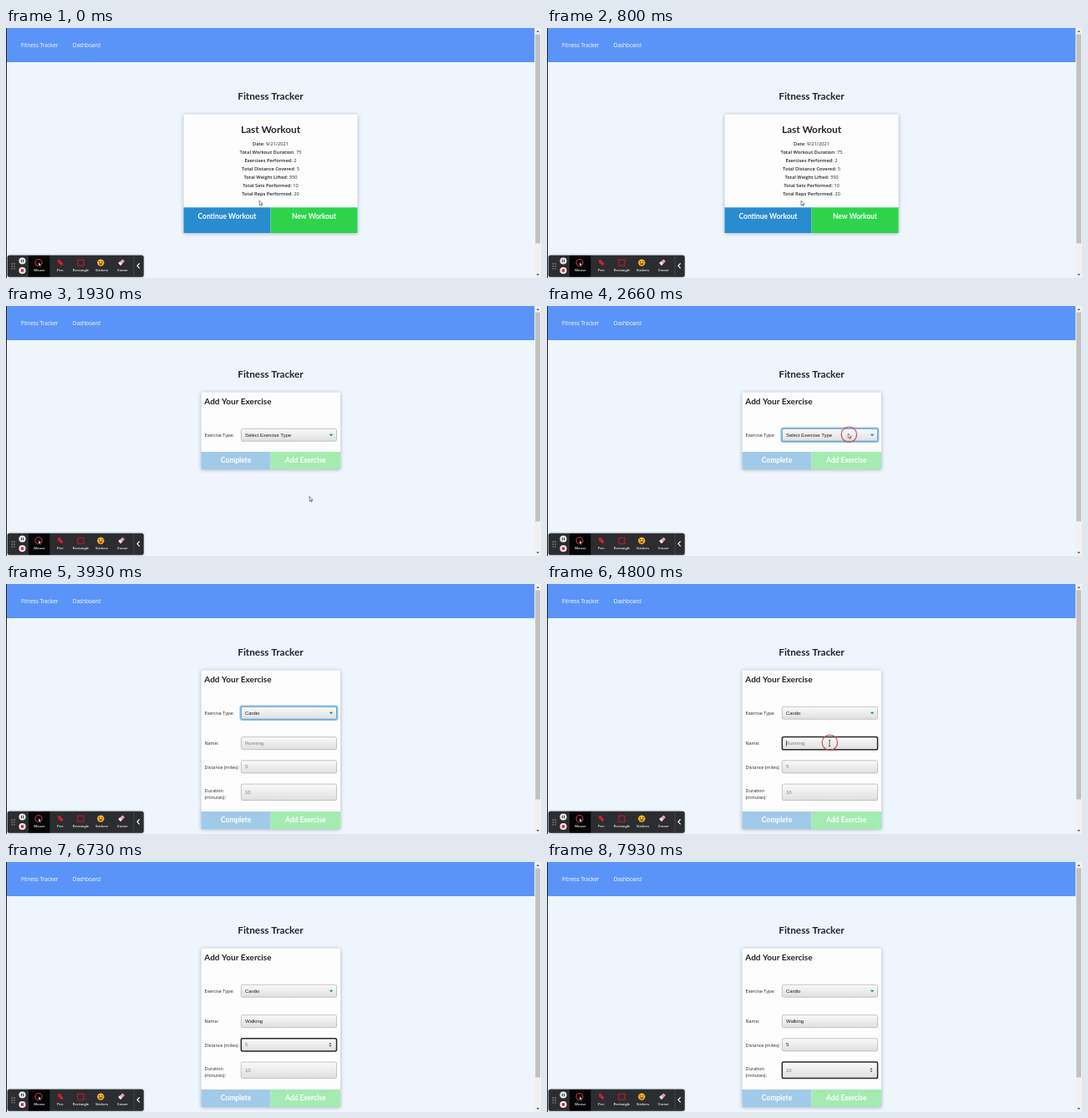
An HTML page with a canvas that plays this animation: 640x300 px, repeating every 8 s.

```html
<!DOCTYPE html>
<html lang="en">
<head>
<meta charset="utf-8">
<title>Fitness Tracker</title>
<style>
html, body { margin: 0; width: 100%; height: 100%; overflow: hidden; background: #eef5fd; }
canvas { display: block; width: 640px; height: 300px; }
</style>
</head>
<body>
<canvas id="stage" width="640" height="300"></canvas>
<script>
const ctx = document.getElementById('stage').getContext('2d');
const LOOP = 8000;
const HEAD = 'Lato, sans-serif';
const BODY = '"Open Sans", "Noto Sans", sans-serif';
const FIELD = '"Liberation Sans", Arial, sans-serif';
const INK = '#212529';

// Moments of the session, in ms
const AT = { form: 1690, select: 2620, cardio: 3400, name: 4700, distance: 6200, five: 7050, duration: 7400 };
const KEYS = [5000, 5150, 5330, 5480, 5620, 5760, 5900];
const PATH = [[0, 304, 209], [760, 304, 209], [1360, 364, 234], [1850, 364, 234], [2500, 361, 155], [3250, 361, 155]];
const PATH_BACK = [[4250, 350, 168], [4620, 338, 191], [4980, 338, 191]];

function rect(x, y, w, h, fill) {
  ctx.fillStyle = fill;
  ctx.fillRect(x, y, w, h);
}

function roundRect(x, y, w, h, r, fill, stroke, width = 1) {
  ctx.beginPath();
  ctx.roundRect(x, y, w, h, r);
  if (fill) { ctx.fillStyle = fill; ctx.fill(); }
  if (stroke) { ctx.strokeStyle = stroke; ctx.lineWidth = width; ctx.stroke(); }
}

function circle(x, y, r, fill, stroke, width = 1) {
  ctx.beginPath();
  ctx.arc(x, y, r, 0, Math.PI * 2);
  if (fill) { ctx.fillStyle = fill; ctx.fill(); }
  if (stroke) { ctx.strokeStyle = stroke; ctx.lineWidth = width; ctx.stroke(); }
}

function poly(points, fill, stroke, width = 0.7) {
  ctx.beginPath();
  points.forEach(([x, y]) => ctx.lineTo(x, y));
  ctx.closePath();
  ctx.fillStyle = fill;
  ctx.fill();
  if (stroke) { ctx.strokeStyle = stroke; ctx.lineWidth = width; ctx.stroke(); }
}

function line(points, color, width) {
  ctx.beginPath();
  points.forEach(([x, y]) => ctx.lineTo(x, y));
  ctx.strokeStyle = color;
  ctx.lineWidth = width;
  ctx.stroke();
}

function text(str, x, y, size, font, color, weight = 400, align = 'left') {
  ctx.font = `${weight} ${size}px ${font}`;
  ctx.fillStyle = color;
  ctx.textAlign = align;
  ctx.fillText(str, x, y);
  return ctx.measureText(str).width;
}

function shade(y, h, top, bottom) {
  const g = ctx.createLinearGradient(0, y, 0, y + h);
  g.addColorStop(0, top);
  g.addColorStop(1, bottom);
  return g;
}

function card(x, y, w, h) {
  ctx.save();
  ctx.shadowColor = 'rgba(60, 75, 95, .42)';
  ctx.shadowBlur = 4;
  ctx.shadowOffsetY = 0.6;
  roundRect(x, y, w, h, 1.5, '#fdfdfd');
  ctx.restore();
}

function button(x, y, w, h, label, base, fill) {
  rect(x, y, w, h, fill);
  text(label, x + w / 2, base, 8.45, HEAD, '#fff', 700, 'center');
}

function drawPage() {
  rect(0, 0, 640, 300, '#eef5fd');
  rect(0, 0, 632.5, 41, '#5a94f9');
  text('Fitness Tracker', 18, 23.4, 6.45, BODY, '#fff');
  text('Dashboard', 79.7, 23.4, 6.45, BODY, '#fff');
  text('Fitness Tracker', 316.5, 86.2, 11.75, HEAD, INK, 700, 'center');
  rect(0, 0, 1, 300, '#20252c');

  rect(632.5, 0, 7.5, 300, '#f1f1f1');
  rect(633.3, 7.5, 5.7, 251, '#c1c1c1');
  poly([[634.4, 5], [638, 5], [636.2, 2.8]], '#606060');
  poly([[634.4, 295], [638, 295], [636.2, 297.2]], '#606060');
}

function drawSummary(mouse) {
  card(212.5, 103.5, 208, 142.5);
  text('Last Workout', 316.5, 125.8, 11.8, HEAD, INK, 700, 'center');
  const rows = [['Date', '9/21/2021'], ['Total Workout Duration', 75], ['Exercises Performed', 2],
    ['Total Distance Covered', 5], ['Total Weight Lifted', 350], ['Total Sets Performed', 10], ['Total Reps Performed', 20]];
  rows.forEach(([label, value], i) => {
    const rest = ': ' + value;
    ctx.font = `400 5.7px ${BODY}`;
    const restWidth = ctx.measureText(rest).width;
    ctx.font = `600 5.7px ${BODY}`;
    const x = 316.5 - (restWidth + ctx.measureText(label).width) / 2;
    const y = 140.7 + i * 10.08;
    const w = text(label, x, y, 5.7, BODY, INK, 600);
    text(rest, x + w, y, 5.7, BODY, INK);
  });
  const over = mouse && mouse.y > 215 && mouse.x > 316.5;
  button(212.5, 215.3, 104, 30.7, 'Continue Workout', 229, '#298ccf');
  button(316.5, 215.3, 104, 30.7, 'New Workout', 229, over ? '#1bb934' : '#2dd44b');
}

function box(y, h, focus) {
  if (focus === 'blue') roundRect(280.5, y - 0.5, 115.8, h + 1, 2.2, null, '#8ec5ee', 2.2);
  const edge = { blue: '#4a8fc4', dark: '#26282b' }[focus] || '#b5b7b9';
  roundRect(281.3, y + 0.3, 114.2, h - 0.6, 1.8, shade(y, h, '#fafafa', '#dfdfdf'), edge, focus === 'dark' ? 1.5 : 0.8);
}

function field(y, h, value, hint, focused, caret, spinner) {
  box(y, h, focused && 'dark');
  const base = y + h / 2 + 2.1;
  const w = text(value || hint, 286, base, 6, FIELD, value ? '#1c1c1c' : '#7b7d80');
  if (focused && caret) rect(286 + (value ? w : 0) + 0.2, base - 5.4, 0.7, 6.8, '#111');
  if (focused && spinner) {
    const my = y + h / 2;
    poly([[386.4, my - 0.7], [389.4, my - 0.7], [387.9, my - 2.5]], '#444');
    poly([[386.4, my + 0.7], [389.4, my + 0.7], [387.9, my + 2.5]], '#444');
  }
}

function blink(t, since) {
  return (t - since) % 1000 < 500;
}

function drawForm(t) {
  const open = t >= AT.cardio;
  const bottom = open ? 294 : 196;
  card(233.5, 103.5, 166.5, bottom - 103.5);
  text('Add Your Exercise', 237.3, 117.7, 10, HEAD, INK, 700);
  text('Exercise Type:', 237.5, 157, 5.4, BODY, INK);
  box(147, 15.5, t >= AT.select && t < AT.name && 'blue');
  text(open ? 'Cardio' : 'Select Exercise Type', 286, 156.8, 5.9, FIELD, '#1c1c1c');
  poly([[386.6, 153.8], [391.4, 153.8], [389, 156.3]], '#1787a8');

  if (open) {
    text('Name:', 237.5, 193.3, 5.45, BODY, INK);
    text('Distance (miles):', 237.5, 221.6, 5.45, BODY, INK);
    text('Duration', 237.5, 249.8, 5.45, BODY, INK);
    text('(minutes):', 237.5, 257.9, 5.45, BODY, INK);

    const count = KEYS.filter(k => k <= t).length;
    const lastKey = count ? KEYS[count - 1] : AT.name;
    field(183.3, 15.7, 'Walking'.slice(0, count), 'Running', t >= AT.name && t < AT.distance, blink(t, lastKey));
    const typed = t >= AT.five;
    field(211.5, 15.7, typed ? '5' : '', '5', t >= AT.distance && t < AT.duration,
      blink(t, typed ? AT.five : AT.distance), true);
    field(239.8, 20, '', '10', t >= AT.duration, blink(t, AT.duration), true);
  }
  const y = bottom - 21;
  button(233.5, y, 83, 21, 'Complete', y + 13.4, '#a1cae8');
  button(316.5, y, 83.5, 21, 'Add Exercise', y + 13.4, '#a4ebb1');
}

function arrow(x, y, scale = 1, fill = '#fff', edge = '#333') {
  const shape = [[0, 0], [0, 5.6], [1.3, 4.5], [2.2, 6.5], [3.1, 6.1], [2.2, 4.2], [4, 4.1]];
  poly(shape.map(([a, b]) => [x + a * scale, y + b * scale]), fill, edge, 0.6);
}

function hand(x, y) {
  const shape = [[-0.8, -3], [0.4, -3], [0.5, -0.6], [2.8, 0], [3.2, 0.7], [2.8, 3], [2.2, 4.2], [-0.7, 4.2],
    [-2.6, 1.4], [-2.2, 0.7], [-0.8, 1.6]];
  poly(shape.map(([a, b]) => [x + a, y + b]), '#fff', '#222', 0.6);
}

function beam(x, y) {
  line([[x, y - 3.5], [x, y + 3.5]], '#333', 0.7);
  [-3.5, 3.5].forEach(d => line([[x - 1.2, y + d], [x + 1.2, y + d]], '#333', 0.7));
}

function along(path, t) {
  if (t < path[0][0]) return null;
  for (let i = 1; i < path.length; i++) {
    const [t0, x0, y0] = path[i - 1];
    const [t1, x1, y1] = path[i];
    if (t < t1) {
      const p = (t - t0) / (t1 - t0);
      const e = p * p * (3 - 2 * p);
      return { x: x0 + (x1 - x0) * e, y: y0 + (y1 - y0) * e };
    }
  }
  return null;
}

function drawMouse(t, mouse) {
  if (!mouse) return;
  const { x, y } = mouse;
  if (t < AT.form && y > 215) hand(x, y);
  else if (t > AT.cardio && y > 184) beam(x, y);
  else arrow(x - 0.8, y - 2);
  const pressed = [1610, AT.select, AT.name].some(at => t >= at && t < at + 130);
  if (pressed) circle(x + 0.3, y - 0.8, 9.2, null, '#d6455c', 1.2);
}

function drawToolbar() {
  ctx.save();
  ctx.shadowColor = 'rgba(0, 0, 0, .4)';
  ctx.shadowBlur = 2;
  roundRect(1.7, 272.7, 163, 26, 2.5, '#2c2d30');
  ctx.restore();
  rect(27, 273, 25.3, 25.5, '#050506');
  rect(152.6, 273, 0.8, 25.5, '#4a4b4e');
  for (let i = 0; i < 6; i++) circle(7.2 + (i % 2) * 2.8, 283 + (i >> 1) * 2.9, 0.65, '#c8c8ca');

  circle(19.5, 279.5, 4.1, '#ececee');
  rect(17.9, 277.8, 1, 3.4, '#2c2d30');
  rect(20.1, 277.8, 1, 3.4, '#2c2d30');
  circle(19.5, 291, 4.1, '#ececee');
  rect(17.8, 289.3, 3.4, 3.4, '#d72638');

  circle(39, 281.5, 4, null, '#d92b43', 1.1);
  arrow(39, 281, 0.85, '#fff', '#111');

  poly([[61.8, 278.5], [64, 277.8], [68.5, 283], [66.6, 285], [62, 281.2]], '#dc1f3c');
  line([[62.3, 279], [65, 282]], '#751323', 0.6);
  ctx.strokeStyle = '#c3162f';
  ctx.lineWidth = 1.1;
  ctx.strokeRect(85.8, 278.2, 7.2, 7);

  circle(113.3, 281.6, 4.2, '#f6b52b');
  rect(111, 280, 1.2, 1.3, '#57380a');
  rect(114.4, 280, 1.2, 1.3, '#57380a');
  ctx.beginPath();
  ctx.arc(113.3, 282, 2.3, 0.2, Math.PI - 0.2);
  ctx.fillStyle = '#7c3b18';
  ctx.fill();

  poly([[134.3, 282], [139.5, 277.6], [142, 280], [137, 284.9]], '#e9a0ab');
  poly([[134.3, 282], [136.3, 280.3], [139, 283], [137, 284.9]], '#f3e7e9');

  [['Mouse', 39.9], ['Pen', 64.8], ['Rectangle', 89.5], ['Stickers', 114.6], ['Eraser', 139.6]]
    .forEach(([label, x]) => text(label, x, 292.2, 4.1, BODY, '#f1f1f2', 600, 'center'));
  line([[159.7, 282.3], [157, 285.3], [159.7, 288.3]], '#fff', 1.2);
}

function draw(now) {
  const t = now % LOOP;
  const mouse = along(PATH, t) || along(PATH_BACK, t);
  drawPage();
  if (t < AT.form) drawSummary(mouse);
  else drawForm(t);
  drawToolbar();
  drawMouse(t, mouse);
}

const start = performance.now();
function tick() {
  draw(performance.now() - start);
  requestAnimationFrame(tick);
}
tick();
</script>
</body>
</html>
```
